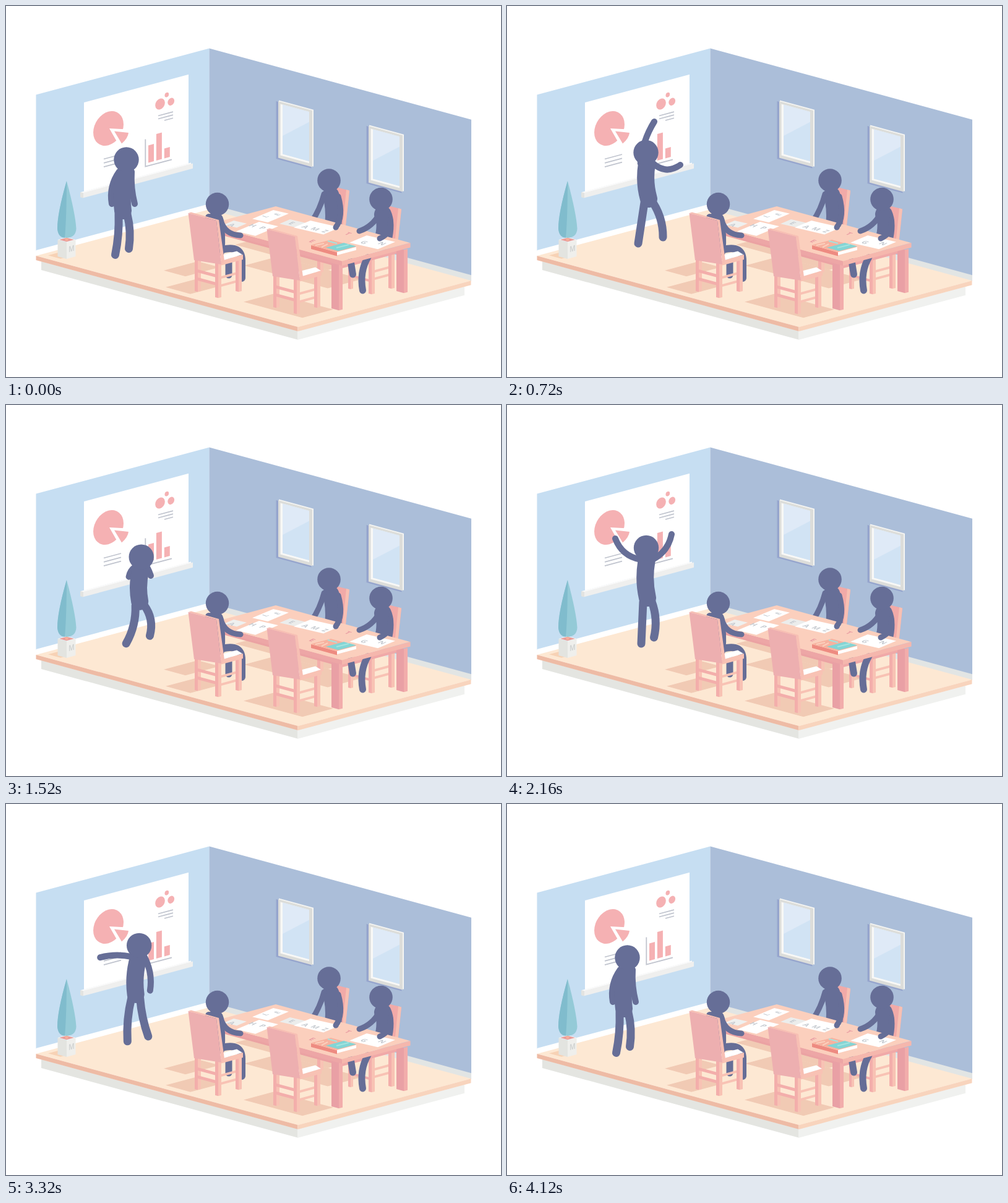
An HTML page that plays this animation: 800 px wide and 600 px high, repeating every 4440 ms.

```html
<!DOCTYPE html>
<html lang="en">
<head>
<meta charset="utf-8">
<title>Presentation</title>
<style>
html, body { margin: 0; width: 100%; height: 100%; overflow: hidden; background: #fff; }
svg { display: block; width: 800px; height: 600px; }
text { font: 700 13px "Open Sans", sans-serif; text-anchor: middle; }
</style>
</head>
<body>
<svg id="stage" viewBox="0 0 800 600"></svg>
<script>
const INK = '#666e97', PINK = '#f5b1b3', GREY = '#c0c4ce', SHADE = '#f1cab4';
const WOOD = '#f3aeab', WOOD_LIT = '#f8c2b4';
const RISE = 0.268, FALL = 0.272;  // slopes of the two room axes

const poly = (points, fill) => `<polygon points="${points}" fill="${fill}"/>`;
const line = (d, color, width, cap = 'butt') =>
  `<path d="${d}" fill="none" stroke="${color}" stroke-width="${width}" stroke-linecap="${cap}"/>`;
const limb = (d, width) => line(d, INK, width, 'round');
const dot = (x, y, r, fill = INK) => `<circle cx="${x}" cy="${y}" r="${r}" fill="${fill}"/>`;
const at = (x, y, content) => `<g transform="translate(${x} ${y})">${content}</g>`;

// upright faces that rise or fall to the right, and a flat one from its far corner
const face = (x, y, w, h, slope, fill) =>
  poly([x, y, x + w, y + w * slope, x + w, y + w * slope + h, x, y + h], fill);
const up = (x, y, w, h, fill) => face(x, y, w, h, -RISE, fill);
const down = (x, y, w, h, fill) => face(x, y, w, h, FALL, fill);
const flat = (x, y, a, b, fill, fall = FALL, rise = RISE) =>
  poly([x, y, x + a, y + a * fall, x + a - b, y + a * fall + b * rise, x - b, y + b * rise], fill);

const post = (x, top, bottom, w = 5, side = w, dark = WOOD, lit = WOOD_LIT) =>
  down(x, top, w, bottom - top, dark) + up(x + w, top + w * FALL, side, bottom - top, lit);
const wallDot = (x, y, r) =>
  `<circle r="${r}" fill="${PINK}" transform="matrix(.9 -.241 0 1 ${x} ${y})"/>`;
const letter = (ch, x, y, fill = '#c5cad0', turned = false) =>
  `<text y="5" fill="${fill}" transform="matrix(${turned ? '.9 -.25 .7 .27' : '.85 .27 -.75 .38'} ${x} ${y})">${ch}</text>`;

const room = () =>
  up(48.5, 143.5, 280, 253, '#c6def2') +
  down(328.5, 68.5, 423.5, 253, '#abbed9') +
  down(57, 413, 414, 14, '#e4e5e1') +
  up(471, 526, 270, 14, '#f0f1ef') +
  up(48.5, 395, 280, 10, '#fff') +
  down(328.5, 320, 423.5, 10, '#e2e5e4') +
  flat(328.5, 329, 423.5, 280, '#fde8d3') +
  down(48.5, 404, 423, 7, '#eebba5') +
  up(471.5, 519.2, 280, 7, '#f8d4bd');

function screen() {
  const rule = (x, y, w) => line(`M${x} ${y}l${w} ${-w * RISE}`, GREY, 1.8);
  const bars = [28, 43, 16].map((h, i) => up(230 + 12.9 * i, 253.5 - 3.5 * i - h, 9, h, PINK));
  const notes = [0, 1, 2].map(i => rule(158, 247.5 + 6.3 * i, 28) +
    rule(i < 2 ? 246 : 256, 177.5 + 5 * i - (i < 2 ? 0 : 2.5), i < 2 ? 24 : 14));
  return up(126, 156, 169, 144, '#fff') +
    up(121, 301, 178, 3, '#fafafa') + up(125, 302, 177, 8.3, '#efefee') +
    down(120, 301, 5, 8.3, '#e2e3e1') +
    wallDot(165.5, 198, 27.2) +
    poly('167,198 196,199.5 183,226', '#fff') +
    `<path d="M175 202.5L198 205Q197 214 187 222.5Z" fill="${PINK}"/>` +
    wallDot(249, 158.5, 8.7) + wallDot(259.8, 143.7, 3.7) + wallDot(266.7, 154.8, 6) +
    notes.join('') + line('M225.3 215.5V259.7L268 248.3', GREY, 1.8) + bars.join('');
}

const pane = () =>
  down(436.5, 154, 57, 93, '#96a5cd') +
  down(441, 152.5, 56, 92, '#f5f5f2') +
  down(440, 154, 55, 91.5, '#dcddda') +
  down(443.5, 158.5, 46.5, 83, '#f8f8f6') +
  down(447, 159.5, 43, 80, '#d1e3f4') +
  poly('447,159.5 490,171.2 490,187.5 447,210', '#dfeaf7');

function plant() {
  const leaf = 'M98 283Q83 335 83 360Q84 374 ';
  return flat(84, 399, 20, 16, '#f7d2b5') +
    post(83.5, 378, 405, 14.5, 14.5, '#e3e4e0', '#efefec') +
    flat(98, 374, 14.5, 14.5, '#f7f7f4') + flat(98, 374.7, 12, 12, '#e99c99') +
    dot(98, 377.5, 2.5, '#f6b09c') +
    `<path d="${leaf}98 375Q113 374 113.5 360Q112 335 98 283" fill="#94cad7"/>` +
    `<path d="${leaf}95 375Q98 340 98 283" fill="#80bccd"/>` +
    '<text fill="#d2d4d3" transform="matrix(.8 -.22 0 1 106 397)">M</text>';
}

const shadows = () =>
  flat(310, 413, 35, 55, SHADE) + flat(306, 442, 40, 48, SHADE) +
  flat(434, 465, 95, 50, SHADE) + flat(430, 370, 150, 60, SHADE) + flat(440, 405, 135, 55, SHADE);

const chair = () =>
  post(371, 406, 461) + post(305, 408, 461) +
  down(310, 426, 28, 5, WOOD) + down(310, 439, 28, 5, WOOD) +
  up(348, 437, 23, 4, WOOD_LIT) + up(348, 450, 23, 4, WOOD_LIT) +
  post(338, 414, 471) +
  up(346, 412, 37, 8, WOOD_LIT) +
  poly('344,404 373,396.5 382,402 345,413', '#fff') +
  poly('294.5,335 299,333.5 344,346 353,412 348,418 340,347', '#f7bfb4') +
  poly('294.5,335 340,347 348,418 304,411', '#edafb0');

const farBack = () =>
  poly('534,293 555,298.5 549,355 534,358', '#f1aaa8') +
  poly('550,297 555,298.5 549,355 544,356', '#f8c0b3');

const farSitters = () =>
  post(503, 402, 430) + farBack() +
  limb('M525 306Q531 325 529 352', 27) + limb('M514 304Q508 328 494 349', 9) + dot(522, 282, 18.8) +
  post(553, 415, 457, 4) + post(618, 398, 456) +
  up(596, 427, 22, 4, WOOD_LIT) + up(596, 439, 22, 4, WOOD_LIT) +
  down(561, 435, 25, 4, WOOD) + post(586, 408, 465) +
  at(84, 30, farBack()) +
  limb('M609 337Q616 352 609 380', 28) + dot(606, 312.5, 18.8);

const farArms = () =>
  limb('M537 308Q546 340 533 358', 9) +
  limb('M603 337Q592 357 571 364', 9) + limb('M621 346Q623 368 604 376', 9);

const table = () =>
  down(350, 364, 180, 7, '#eba2a3') + up(540, 416, 96, 9, '#f0a9a8') +
  post(631, 391, 461, 12, 6, '#e9a0a5', '#f2adab') +
  post(526, 414, 489, 12, 6, '#e9a0a5', '#f2adab') +
  limb('M557 412L560.5 434', 11) + limb('M585 406Q571 430 576.5 460', 11) +
  down(326, 353.5, 217, 7.5, '#eda6a6') + up(543, 412.5, 110.5, 7.5, '#f5b7ad') +
  flat(436, 324, 217, 110, '#fbcfbd');

function papers() {
  const sheet = (x, y, w, d, fill = '#fff') => flat(x, y, w, d, fill, 0.23, 0.42);
  const row = (text, x, y) =>
    [...text].map((ch, i) => letter(ch, x + 16 * i, y + 3.6 * i)).join('');
  const pink = '#e99ca3';
  return sheet(432, 330, 25, 34) + letter('L', 419, 340, undefined, true) +
    letter('E', 438, 337, undefined, true) +
    sheet(368, 347, 21, 16, '#eff0ef') + row('A', 365, 354) +
    sheet(409, 349, 31, 37) + row('HP', 399, 355) +
    sheet(459, 345, 26, 17, '#ecedec') + row('E', 462, 351) +
    sheet(492, 347, 48, 27) + row('AMZ', 484, 357) +
    sheet(583, 371, 46, 28) + row('G', 579, 382) + row('N', 608, 384) +
    letter('E', 495, 380, pink) + letter('T', 553, 368, pink) +
    down(493, 387, 42, 6, '#ee8b81') + up(535, 398, 31, 5, '#fff') +
    flat(525, 378, 41, 32, '#f7b29f') + flat(546, 383, 20, 29, '#83d5d5') +
    line('M500 387l14 -3M510 390l10 -5', '#fbcfbd', 2) +
    line('M520 380l15 4M534 391l20 -5', '#a5e3df', 2);
}

const nearSitter = () =>
  limb('M349 394Q381 386 381 412V440', 12) + limb('M360 410V435', 11) +
  limb('M338 347Q342 370 340 395', 27) + limb('M328 342L344 346', 12) +
  limb('M347 346Q353 370 379 371', 9) + dot(341.5, 320.5, 18.7);

const furniture = () =>
  shadows() + farSitters() + table() + papers() + farArms() +
  nearSitter() + chair() + at(127, 26, chair());

// head, hip, then left hand, right hand, left foot, right foot as x, y, bend
const idle = [[194.5, 248.5], [189, 331], [171, 320, .21], [208, 320, .08], [176.5, 402.5, -.06], [198.5, 392.5, -.1]];
const pointRight = [[221, 237], [226, 312], [206, 298, .2], [272, 256, .3], [211, 384], [246, 377, -.12]];
const reachUp = [[224.5, 237], [229, 312], [238, 187, -.12], [280, 257, .4], [212, 384], [252, 374, -.15]];
const pointLeft = [[208, 238], [208, 313], [163, 252, .2], [213, 300, -.3], [186, 384, -.1], [226, 378, -.2]];
const crouch = [[233, 256], [227, 324], [246, 312, .2], [262, 244, .3], [205, 388, -.2], [241, 367, -.3]];
const cheer = [[225, 231], [227, 312], [175, 216, -.28], [266, 209, .24], [217, 386], [237.5, 376, -.15]];
const armsDown = [[202, 232.6], [210, 309], [159.5, 289, .25], [233.4, 298, -.2], [195, 385, .1], [237, 371, .1]];
const armOut = [[214, 229], [209, 308], [150, 247, .2], [231, 304, -.15], [196, 384, .08], [229, 376, .07]];
const explain = [[221, 228], [213, 308], [163, 254, -.28], [242, 290, -.25], [198, 383, .05], [234, 376, .05]];

const LOOP = 4440, STEP = 40;
const moves = [
  [0, 320, pointRight], [440, 720, reachUp], [840, 1120, pointLeft],
  [1400, 1680, crouch], [1840, 2160, cheer], [2400, 2640, armsDown],
  [2800, 3040, armOut], [3280, 3520, explain], [3720, 4120, idle]
];

const mix = (a, b, k) => a + (b - a) * k;
const mixJoint = ([x, y, bend = 0], [x2, y2, bend2 = 0], k) =>
  [mix(x, x2, k), mix(y, y2, k), mix(bend, bend2, k)];

function poseAt(time) {
  let from = idle;
  for (const [start, end, to] of moves) {
    if (time < start) break;
    const k = Math.min(1, (time - start) / (end - start));
    from = from.map((joint, i) => mixJoint(joint, to[i], k));
  }
  return from;
}

function speaker([head, hip, ...ends]) {
  const neck = mixJoint(head, hip, 0.27);
  const limbs = ends.map(([x, y, bend], i) => {
    const side = i % 2 ? 1 : -1, isArm = i < 2;
    const sx = isArm ? neck[0] + 10 * side : hip[0] + 7 * side;
    const sy = isArm ? neck[1] - 3 : hip[1] + 6;
    const cx = (sx + x) / 2 - bend * (y - sy), cy = (sy + y) / 2 + bend * (x - sx);
    return limb(`M${sx} ${sy}Q${cx} ${cy} ${x} ${y}`, isArm ? 10 : 13);
  });
  const waist = mixJoint(neck, hip, 0.5);
  return limbs.join('') +
    limb(`M${neck[0]} ${neck[1]}Q${waist[0] - 6} ${waist[1]} ${hip[0]} ${hip[1]}`, 28) +
    dot(head[0], head[1], 20.2);
}

const stage = document.getElementById('stage');
stage.innerHTML = room() + screen() + pane() + at(146, 40, pane()) + plant() +
  '<g id="speaker"></g>' + furniture();
const actor = document.getElementById('speaker');

const begin = performance.now();
function tick() {
  const time = (performance.now() - begin) % LOOP;
  actor.innerHTML = speaker(poseAt(Math.floor(time / STEP) * STEP));
  requestAnimationFrame(tick);
}
tick();
</script>
</body>
</html>
```
